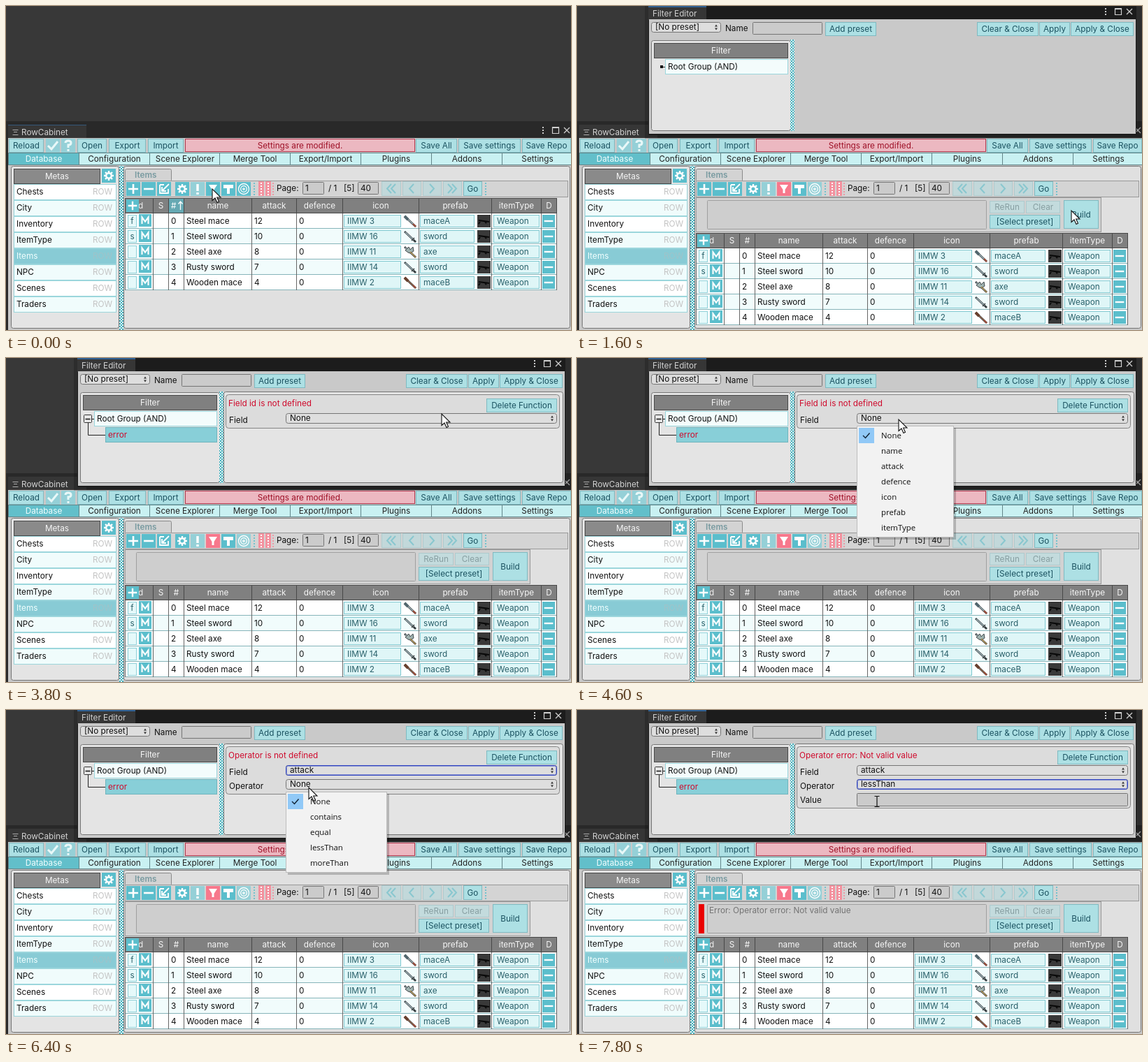
Recreate the animation shown at these times as an HTML page. Size 808x464 px, loop 8000 ms.

```html
<!DOCTYPE html>
<html lang="en">
<head>
<meta charset="utf-8">
<title>Filter editor</title>
<style>
html, body { margin: 0; width: 100%; height: 100%; overflow: hidden; background: #383838; }
svg { display: block; width: 808px; height: 464px; font: 11.75px Inter, sans-serif; }
text { white-space: pre; }
.menu text { font: 11.4px "Open Sans", sans-serif; }
</style>
</head>
<body>
<svg id="stage" viewBox="0 0 808 464"></svg>
<script>
const TEAL = '#5bbecc', PALE = '#95d0d7', INK = '#101010', BTN_INK = '#1b5260';
const PANEL = '#e4e4e4', FRAME = '#757575', SHADOW = 'rgba(0,0,0,.2)';

// Boxes are given by their left, top, right and bottom edges.
const box = (l, t, r, b, fill, line, round = 0) => line
  ? `<rect x="${l + .5}" y="${t + .5}" width="${r - l - 1}" height="${b - t - 1}" rx="${round}" fill="${fill}" stroke="${line}"/>`
  : `<rect x="${l}" y="${t}" width="${r - l}" height="${b - t}" rx="${round}" fill="${fill}"/>`;
const text = (s, x, mid, fill = INK, anchor = 'start', extra = '') =>
  `<text x="${x}" y="${Math.round(mid + 4)}" fill="${fill}" text-anchor="${anchor}" ${extra}>${s.replace('&', '&amp;')}</text>`;
const path = (d, stroke, width = 1, fill = 'none') =>
  `<path d="${d}" stroke="${stroke}" stroke-width="${width}" fill="${fill}"/>`;
const group = (id, body, cls = '') => `<g id="${id}" class="${cls}">${body}</g>`;
const repeat = (n, f) => Array.from({ length: n }, (_, i) => f(i)).join('');

const label = (s, l, t, r, b, fill, ink, line) =>
  box(l, t, r, b, fill, line) + text(s, (l + r) / 2, (t + b) / 2, ink, 'middle');
const button = (s, l, t, r, b) => label(s, l, t, r, b, '#ade0e4', BTN_INK, '#7fbac1');
const faded = (s, l, t, r, b) => label(s, l, t, r, b, '#c3dbdd', '#879ea1', '#aecacd');
const header = (s, l, t, r, b, fill = '#808080') => label(s, l, t, r, b, fill, '#f6f6f6', '#484848');
const input = (s, l, t, r, b) => box(l, t, r, b, '#cbcbcb', FRAME, 1) + text(s, l + 4, (t + b) / 2);
const cellButton = (s, l, r, mid) =>
  box(l, mid - 9, r, mid + 9, '#dff6f7', '#7fc8d0') + text(s, l + 5, mid, '#285f69');
const dropdown = (s, l, t, r, focus) => {
  const m = t + 7.5;
  return box(l, t, r, t + 15, '#dedede', FRAME, 3) +
    (focus ? box(l, t, r, t + 15, 'none', '#3346c0', 3) + box(l + 1, t + 1, r - 1, t + 14, 'none', '#8792d2', 2) : '') +
    text(s, l + 6, m - .5) + path(`M${r - 9} ${m - 1}l2-3 2 3zM${r - 9} ${m + 1}l2 3 2-3z`, 'none', 0, '#333');
};
const splitter = (l, t, b) =>
  `<rect x="${l}" y="${t}" width="6" height="${b - t}" fill="url(#check)"/>`;

// White glyphs, drawn around the centre of a 20 px tile.
const GEAR = path('M0-7V7M-7 0H7M-5-5L5 5M-5 5L5-5', '#fff', 2.4) +
  `<circle r="3.8" fill="${TEAL}" stroke="#fff" stroke-width="2.4"/>`;
const GLYPH = {
  plus: path('M-7 0H7M0-7V7', '#fff', 2.6),
  minus: path('M-7 0H7', '#fff', 2.6),
  arrow: path('M-6-6H0M6 0V6H-6V-6M7-7L-3 3M-3-3V3H3', '#fff', 1.8),
  gear: GEAR,
  bang: path('M0-7V3M0 5V8', '#fff', 3.4),
  funnel: path('M-6-6H6L1.500 1V6H-1.500V1z', 'none', 0, '#fff'),
  hammer: path('M-7-6H7V-1H2V7H-2V-1H-7z', 'none', 0, '#fff'),
  target: '<g fill="none" stroke="#fff" stroke-width="1.3"><circle r="7.5"/><circle r="4.3"/><circle r="1.2"/></g>',
  m: path('M-5 5.5V-5L0 2L5-5V5.5', '#fff', 2.3),
  tick: path('M-7 0L-2 5L7-6', '#e8f8f8', 3),
  ask: path('M-4-4Q-4-7 0-7T4-4Q4-1 0-1V3M0 5V8', '#e8f8f8', 3),
};
const tile = (name, l, t, fill = TEAL, size = 20) =>
  box(l, t, l + size, t + size, fill) +
  `<g transform="translate(${l + size / 2} ${t + size / 2}) scale(${size / 20})">${GLYPH[name]}</g>`;
const dots = (x, fill) => repeat(5, i => box(x, 253 + i * 4, x + 2, 255 + i * 4, fill));

function windowControls(y, dx) {
  return repeat(3, i => box(dx, y - 5 + i * 4, dx + 2, y - 3 + i * 4, '#ccc')) +
    path(`M${dx + 14.5} ${y - 4.5}h9v9h-9zm0 1h9`, '#d0d0d0', 1.2) +
    path(`M${dx + 31} ${y - 4}l8 8m0-8l-8 8`, '#ccc', 1.3);
}

function mainWindow() {
  const tops = [['Reload', 4, 54], ['Open', 102, 144], ['Export', 147, 200], ['Import', 203, 254],
    ['Save All', 586, 645], ['Save settings', 647, 736], ['Save Repo', 738, 808]];
  const tabs = ['Database', 'Configuration', 'Scene Explorer', 'Merge Tool', 'Export/Import', 'Plugins', 'Addons', 'Settings'];
  const metas = ['Chests', 'City', 'Inventory', 'ItemType', 'Items', 'NPC', 'Scenes', 'Traders'];
  return box(0, 0, 808, 464, '#383838') + box(0, 165, 808, 464, '#292929') +
    box(3, 170, 115, 190, '#363636') + group('mainFocus', box(3, 170, 115, 171, '#34587a')) +
    path('M9.500 177.500h8M11 180.500h5M9.500 184.500h8', '#aaa') + text('RowCabinet', 22, 181, '#d2d2d2') +
    windowControls(178, 767) +
    box(3, 189, 808, 464, '#c8c8c8') +
    tops.map(([s, l, r]) => button(s, l, 190, r, 210)).join('') +
    tile('tick', 57, 190, PALE) + tile('ask', 79, 190, PALE) +
    label('Settings are modified.', 256, 190, 585, 209, '#ecb8c1', '#9e1027', '#b3374e') +
    tabs.map((s, i) => {
      const l = 3 + Math.round(i * 100.8);
      return label(s, l, 210, l + 102, 228, i ? '#c9f1f2' : '#62bfca', i ? '#222' : '#f4ffff', '#628589');
    }).join('') +
    box(7, 229, 162, 462, PANEL, FRAME, 3) + header('Metas', 11, 233, 135, 255, '#8a8a8a') + tile('gear', 137, 233) +
    metas.map((s, i) => {
      const t = 255 + i * 23, on = s === 'Items';
      return box(11, t, 158, t + 23, on ? '#88cbd5' : i % 2 ? '#f0fcfc' : '#fff', '#9bd6dc') +
        text(s, 15, t + 11, on ? '#f2ffff' : INK) + text('ROW', 152, t + 11, on ? '#9fc3c9' : '#c3c3c3', 'end');
    }).join('') +
    box(168, 229, 807, 462, '#e0e0e0', FRAME, 3) + splitter(162, 229, 464) +
    box(170, 233, 237, 252, '#d3d3d3', '#8a8a8a', 2) + text('Items', 184, 242, '#789aa0', 'start', 'font-weight="600"');
}

function gridToolbar() {
  const icons = ['plus', 'minus', 'arrow', 'gear', 'bang', 'funnel', 'hammer', 'target'];
  const lefts = [172, 194, 216, 242, 264, 286, 308, 330];
  const chevron = (x, dir, n) => repeat(n, i => path(`M${x + i * 6 + 3 * dir} 255l${-6 * dir} 6.500l${6 * dir} 6.500`, '#89c7cf', 2));
  return box(170, 250, 804, 274, '#d4d4d4', '#999') +
    icons.map((n, i) => tile(n, lefts[i], 252, n === 'bang' ? PALE : TEAL)).join('') +
    group('funnelOn', tile('funnel', 286, 252, '#f7788c') + tile('target', 330, 252, PALE)) +
    dots(354, '#72c3cd') + [361, 371].map(x => box(x, 251, x + 8, 272, '#f3929f') + dots(x + 3, '#fff')).join('') + dots(381, '#ed98a3') +
    text('Page:', 387, 261) + input('1', 424, 252, 455, 270) + text('/ 1', 461, 261) + text('[5]', 483, 261) + input('40', 503, 252, 533, 270) +
    [[537, 565], [567, 594], [596, 623], [625, 652]].map(([l, r]) => box(l, 251, r, 272, '#c2d8da', '#aecbce')).join('') +
    chevron(548, 1, 2) + chevron(580, 1, 1) + chevron(609, -1, 1) + chevron(635, -1, 2) +
    button('Go', 654, 251, 681, 272) + dots(685, '#72c3cd');
}

function weapon(kind, y) {
  const axe = kind === 'axe', mace = kind[0] === 'm', wood = kind === 'maceB';
  return `<g transform="translate(578 ${y})">` +
    path('M-8-7L8 8', '#343a3d', 2.8) + path('M-7-6L5 5', wood ? '#a06a4d' : '#a9bfc5', 1.2) +
    (mace ? path('M-8-7L-3-2', wood ? '#68402e' : '#52666e', 4) + path('M4 4L8 8', '#a34c38', 2) : '') +
    (axe ? path('M-7-2L-2-7L0-3L4-7L5-1L0 2L-3 1z', '#41494c', 1, '#9fb2b0') + path('M0 0L8 8', '#b5924f', 1.4) : '') +
    (kind === 'sword' ? path('M2 6L6 2', '#3e4546', 1.6) : '') + '</g>';
}

function grid() {
  const edges = [170, 210, 232, 254, 351, 415, 481, 590, 694, 765, 787];
  const heads = ['', 'S', '#', 'name', 'attack', 'defence', 'icon', 'prefab', 'itemType', 'D'];
  const rows = [['f', 'Steel mace', 12, 3, 'maceA'], ['s', 'Steel sword', 10, 16, 'sword'], ['', 'Steel axe', 8, 11, 'axe'],
    ['', 'Rusty sword', 7, 14, 'sword'], ['', 'Wooden mace', 4, 2, 'maceB']];
  return heads.map((s, i) => header(s, edges[i], 275, edges[i + 1] + 1, 297)).join('') +
    text('d', 189, 286, '#eee') + tile('plus', 172, 277, TEAL, 18) +
    group('sorted', box(233, 276, 254, 296, '#66a9b3') + text('#', 236, 286, '#fff') + path('M249.500 292V280M246.500 283.500L249.500 280L252.500 283.500', '#fff', 1.3)) +
    rows.map(([id, name, attack, icon, prefab], i) => {
      const t = 297 + i * 22, y = t + 11;
      return box(170, t, 787, t + 22, i % 2 ? '#f1fcfc' : '#fff') +
        path(`M170 ${t + 21.5}H787`, '#86b4b9') + path(edges.map(x => `M${x + .5} ${t}v22`).join(''), '#666') +
        box(174, y - 9, 187, y + 9, '#e5f9fa', '#8fd0d8') + text(id, 180.5, y, '#285f69', 'middle') +
        tile('m', 190, y - 10, TEAL, 18) + text(String(i), 236, y) + text(name, 258, y) + text(String(attack), 355, y) + text('0', 419, y) +
        cellButton('IIMW ' + icon, 483, 565, y) + weapon(prefab, y) + cellButton(prefab, 592, 670, y) +
        box(674, y - 9, 693, y + 9, '#393939') + path(`M676 ${y - 1}L691 ${y + 1}M678 ${y + 1}l-2 3M684 ${y}l3 3`, '#080808', 1.8) +
        cellButton('Weapon', 697, 763, y) + tile('minus', 767, y - 9, TEAL, 18);
    }).join('');
}

const filterPanel = () =>
  box(170, 274, 750, 324, '#d2d2d2', '#999') + box(186, 278, 586, 320, '#cecece', '#a0a0a0', 1) +
  faded('ReRun', 590, 279, 640, 297) + faded('Clear', 642, 279, 691, 297) +
  button('[Select preset]', 590, 299, 691, 319) + button('Build', 696, 278, 746, 319) +
  group('panelError', box(174, 278, 182, 320, '#ea0000') + text('Error: Operator error: Not valid value', 189, 287, '#737373'));

const rootRow = on =>
  box(126, 76, 302, 98, on ? '#88cfd8' : '#f3fcfc', '#9bd6dc') + text('Root Group (AND)', 130, 87, on ? '#f0ffff' : INK);
const rootDot = box(119, 85, 123, 89, '#111') + path('M123 87.500h3', '#333');
const detailPanel = box(311, 48, 797, 179, PANEL, FRAME, 3);

const groupDetail = () =>
  rootRow(true) + rootDot + detailPanel + box(318, 57, 789, 86, '#dcdcdc', FRAME, 4) +
  text('Use OR (not AND)', 323, 71) + box(475, 63, 488, 75, '#eee', '#666', 2) +
  button('Delete Group', 539, 61, 625, 81) + button('Add Group', 626, 61, 696, 81) + button('Add Function', 697, 61, 784, 81) +
  text('Sort fields', 319, 100) + dropdown('name', 470, 90, 610) + button('Add Sort Field', 614, 89, 792, 109) +
  box(314, 110, 411, 130, '#d3d3d3', '#8a8a8a', 2) + text('Sort Fields', 328, 120, '#789aa0', 'start', 'font-weight="600"') +
  header('Name', 314, 129, 515, 151) + header('Desc', 514, 129, 575, 151) + header('D', 574, 129, 596, 151);

function functionDetail(message, field, operator) {
  const chosen = operator && operator !== 'None';
  return detailPanel + box(314, 52, 792, chosen ? 141 : operator ? 121 : 101, '#dcdcdc', '#858585', 4) +
    text(message, 318, 65, '#cf0a2c') + button('Delete Function', 687, 58, 788, 78) +
    text('Field', 319, 89) + dropdown(field, 400, 79, 788, operator === 'None') +
    (operator ? text('Operator', 319, 109) + dropdown(operator, 400, 99, 788, chosen) : '') +
    (chosen ? text('Value', 319, 129) + input('', 400, 119, 788, 138) : '');
}

const filterWindow = () =>
  box(97, 0, 808, 190, SHADOW) + box(102, 0, 800, 185, '#1c1c1c') + box(102, 0, 185, 20, '#363636') + box(102, 0, 185, 2, '#2f5f91') +
  text('Filter Editor', 108, 11, '#d2d2d2') + windowControls(8, 755) + box(103, 19, 799, 183, '#c9c9c9') +
  dropdown('[No preset]', 106, 23, 206) + text('Name', 212, 32) + input('', 251, 23, 351, 41) +
  button('Add preset', 355, 23, 428, 43) + button('Clear & Close', 572, 23, 660, 43) +
  button('Apply', 661, 23, 705, 43) + button('Apply & Close', 706, 23, 796, 43) +
  box(106, 49, 306, 179, PANEL, FRAME, 3) + header('Filter', 110, 53, 302, 75) +
  group('rootIdle', rootRow(false) + rootDot) + group('rootOn', groupDetail()) +
  group('tree', rootRow(false) + path('M117.500 93V110.500H142M123 87.500h3', '#222') + box(111, 81, 123, 93, '#e8e8e8', '#333', 1) +
    path('M113.500 87.500h7', '#111', 1.5) + box(142, 99, 302, 121, '#88cfd8', '#6fb4bd') + text('error', 146, 110, '#cf0a2c')) +
  group('noField', functionDetail('Field id is not defined', 'None')) +
  group('noOperator', functionDetail('Operator is not defined', 'attack', 'None')) +
  group('noValue', functionDetail('Operator error: Not valid value', 'attack', 'lessThan')) +
  splitter(305, 48, 179);

const menu = (id, items, top, right) => group(id,
  box(403, top + 3, right + 4, top + items.length * 22 + 9, SHADOW) +
  box(400, top, right + 1, top + items.length * 22 + 6, '#f2f2f2', '#bdbdbd') +
  `<rect class="hover" x="403" width="${right - 406}" height="22" fill="#91c9f7"/>` +
  box(403, top + 3, 425, top + 25, '#91c9f7') + path(`M409 ${top + 14}l3.500 3.500 6-7`, '#123', 1.4) +
  items.map((s, i) => text(s, 435, top + 14 + i * 22)).join(''), 'menu');

const stage = document.getElementById('stage');
stage.innerHTML =
  `<defs><pattern id="check" width="4" height="4" patternUnits="userSpaceOnUse">
    <rect width="4" height="4" fill="#e4f7f7"/><path d="M0 0h2v2H0zM2 2h2v2H2z" fill="#41aab8"/></pattern>
  </defs>` + mainWindow() + gridToolbar() + group('panel', filterPanel()) + group('grid', grid()) + group('editor', filterWindow()) +
  menu('fieldMenu', ['None', 'name', 'attack', 'defence', 'icon', 'prefab', 'itemType'], 97, 538) +
  menu('operatorMenu', ['None', 'contains', 'equal', 'lessThan', 'moreThan'], 117, 544) +
  group('arrow', path('M0 0V16.500L4 13L7 19.500L9.500 18.300L6.700 12H12z', '#111', 1.1, '#fff')) +
  group('beam', path('M-3.500-7.500H-1Q0-7.500 0-6.500Q0-7.500 1-7.500H3.500M0-6.500V6.500M-3.500 7.500H-1Q0 7.500 0 6.500Q0 7.500 1 7.500H3.500', '#111', 1.2));

const STEP = 200, STEPS = 40;
// Each part is shown from its first step up to, not including, its second.
const shown = {
  mainFocus: [0, 7], sorted: [0, 2], funnelOn: [2, 40], panel: [2, 40], editor: [7, 40],
  rootIdle: [7, 12], rootOn: [12, 18], tree: [18, 40], noField: [18, 30], noOperator: [30, 37], noValue: [37, 40],
  fieldMenu: [23, 30], operatorMenu: [32, 37], panelError: [37, 40], arrow: [0, 38], beam: [38, 40],
};
// Pointer stops: step, x, y.
const stops = [[0, 295, 262], [2, 295, 262], [6, 705, 294], [8, 707, 293], [11, 185, 90], [12, 185, 88], [15, 548, 89],
  [17, 738, 72], [18, 732, 73], [19, 623, 80], [22, 462, 88], [23, 460, 88], [27, 461, 180], [29, 458, 156], [30, 455, 150],
  [31, 440, 112], [32, 433, 111], [35, 455, 198], [36, 455, 198], [38, 432, 137], [39, 429, 131]];

function pointer(step) {
  const next = stops.findIndex(s => s[0] >= step);
  if (next === 0) return stops[0].slice(1);
  const [a, x0, y0] = stops[next - 1], [b, x1, y1] = stops[next];
  const p = (step - a) / (b - a), e = p * p * (3 - 2 * p);
  return [x0 + (x1 - x0) * e, y0 + (y1 - y0) * e];
}

function hover(id, top, count, y) {
  const i = Math.floor((y - top - 3) / 22), bar = stage.querySelector(`#${id} .hover`);
  bar.style.display = i >= 0 && i < count ? '' : 'none';
  bar.setAttribute('y', top + 3 + i * 22);
}

const byId = id => document.getElementById(id);
let last = -1;
function draw(now) {
  const step = Math.floor(now / STEP) % STEPS;
  if (step === last) return;
  last = step;
  for (const id in shown) byId(id).style.display = step >= shown[id][0] && step < shown[id][1] ? '' : 'none';
  byId('grid').setAttribute('transform', `translate(0 ${step < 2 ? 0 : 50})`);
  const [x, y] = pointer(step);
  for (const id of ['arrow', 'beam']) byId(id).setAttribute('transform', `translate(${x} ${y})`);
  hover('fieldMenu', 97, 7, y);
  hover('operatorMenu', 117, 5, y);
}

const start = performance.now();
function tick() {
  draw(performance.now() - start);
  requestAnimationFrame(tick);
}
tick();
</script>
</body>
</html>
```
